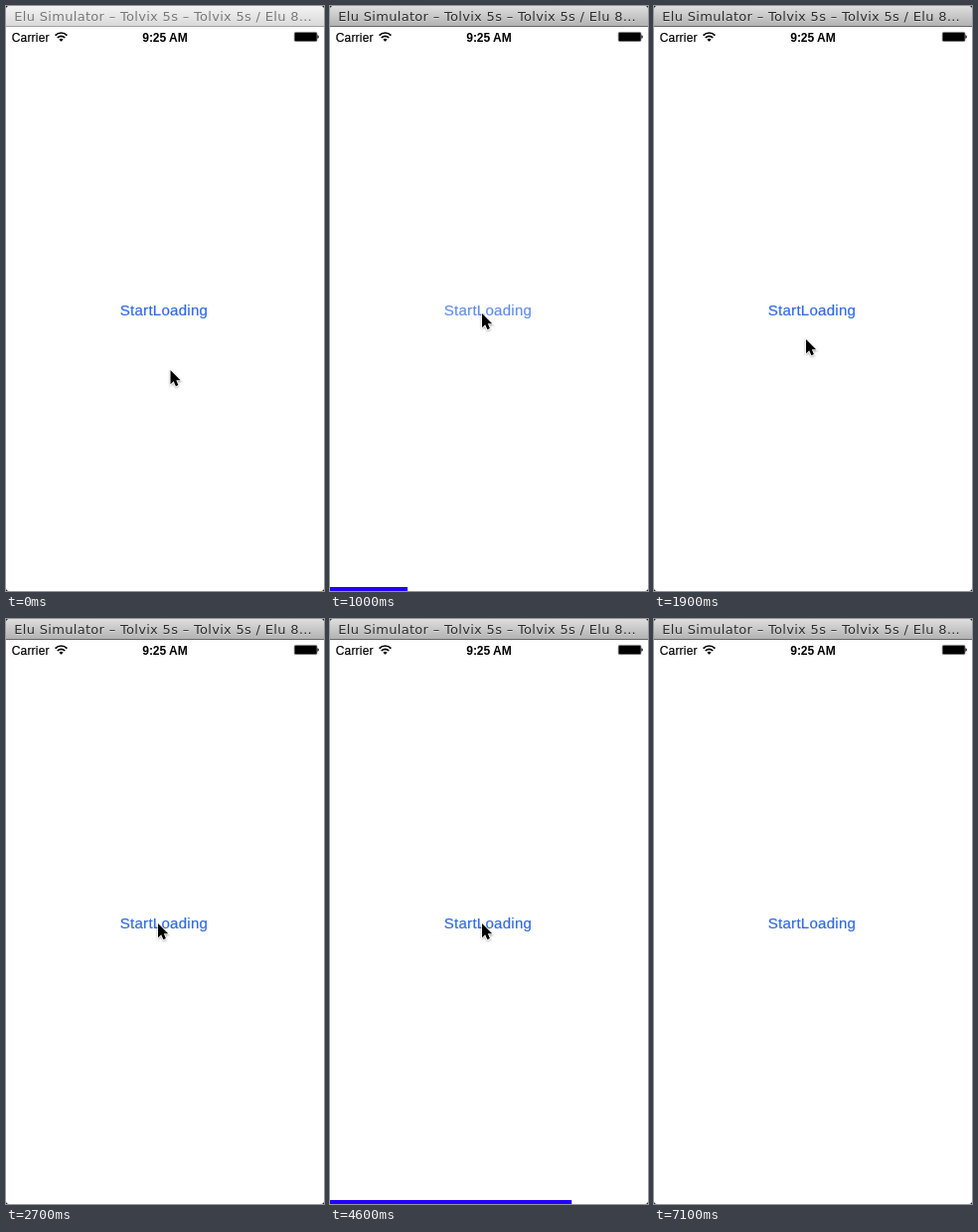
These frames come from a looping animation (320 px wide and 588 px high, 7200 ms). An HTML page:

```html
<!DOCTYPE html>
<html lang="en">
<head>
<meta charset="utf-8">
<title>Loading bar</title>
<style>
  html, body { margin: 0; width: 100%; height: 100%; overflow: hidden; background: #fff; }
  svg { display: block; width: 320px; height: 588px; }
  .ui { font-family: "Liberation Sans", Arial, sans-serif; }
  .title { font: 13px "DejaVu Sans", sans-serif; letter-spacing: .31px; }
</style>
</head>
<body>
<svg viewBox="0 0 320 588" xmlns="http://www.w3.org/2000/svg">
  <defs>
    <linearGradient id="idle" x2="0" y2="1">
      <stop stop-color="#f3f3f3"/><stop offset="1" stop-color="#d8d8d8"/>
    </linearGradient>
    <linearGradient id="active" x2="0" y2="1">
      <stop stop-color="#dedede"/><stop offset="1" stop-color="#b0b0b0"/>
    </linearGradient>
    <filter id="shadow" x="-50%" y="-50%" width="200%" height="200%">
      <feDropShadow dx="0" dy="1" stdDeviation="1" flood-opacity=".4"/>
    </filter>
  </defs>
  <rect width="320" height="588" fill="#fff"/>

  <path d="M0 0h4Q0 0 0 4zM320 0h-4q4 0 4 4z" fill="#222"/>
  <path id="chrome" d="M0 21V4Q0 0 4 0H316Q320 0 320 4V21Z"/>
  <rect id="edge" y="20" width="320" height="1"/>
  <text class="title" x="8.3" y="16" fill="#fff" fill-opacity=".45">Elu Simulator – Tolvix 5s – Tolvix 5s / Elu 8…</text>
  <text class="title" id="title" x="8.3" y="15">Elu Simulator – Tolvix 5s – Tolvix 5s / Elu 8…</text>

  <g class="ui" font-size="12">
    <text x="5.7" y="35.5" letter-spacing=".2" stroke="#000" stroke-width=".2">Carrier</text>
    <text x="160" y="35.5" font-weight="bold" text-anchor="middle">9:25 AM</text>
  </g>
  <g fill="none" stroke="#000" stroke-width="1.7">
    <path d="M49.6 29.6a8 8 0 0 1 11.8 0M51.8 32a5 5 0 0 1 7.4 0"/>
    <path d="M55.5 35.8l-2.1-2.1a3 3 0 0 1 4.2 0z" fill="#000" stroke="none"/>
  </g>
  <rect x="290.2" y="26.4" width="22.8" height="9.2" rx="1.4" fill="#222" stroke="#666" stroke-width=".6"/>
  <rect x="291" y="27" width="21" height="8" rx=".8"/>
  <path d="M313.4 29.2q1.4.3 1.4 1.8t-1.4 1.8z"/>

  <text class="ui" id="button" x="114.8" y="310.5" font-size="15" letter-spacing=".27"
    fill="#2e69e6" stroke="#2e69e6" stroke-width=".2">StartLoading</text>

  <path d="M0 585v3h3q-3 0-3-3zM320 585v3h-3q3 0 3-3z" fill="#111"/>
  <rect id="bar" y="584" height="4" fill="#2200fe"/>
  <path id="cursor" filter="url(#shadow)" stroke="#fff" stroke-width="1.2" paint-order="stroke"
    d="M0 0V14.2L3.2 11.2L5.4 16.2L7.9 15.1L5.8 10.3H10.2Z"/>
</svg>
<script>
  const LOOP = 7200, TICK = 100;
  const ACTIVATE = 700, HIDE_CURSOR = 5700;
  const BAR_SPEED = 0.64, BAR_LIFE = 560, FADE = 450, DIM = 0.2;

  // Each click: finger down, finger up, bar start
  const clicks = [
    { down: 700, up: 800, bar: 878 },
    { down: 2800, up: 2980, bar: 2990 },
    { down: 4100, up: 4200, bar: 4220 }
  ];
  // Pointer path: time, x, y
  const path = [
    [0, 165.5, 366], [650, 153, 309], [1400, 153, 309],
    [1800, 153, 335], [2000, 153, 335], [2450, 153, 306]
  ];

  const el = id => document.getElementById(id);
  const set = (id, attrs) => {
    for (const key in attrs) el(id).setAttribute(key, attrs[key]);
  };
  const smooth = p => p * p * (3 - 2 * p);
  const easeOut = p => 1 - (1 - p) ** 2;

  function pointer(t) {
    const i = path.findIndex(p => p[0] > t);
    if (i < 0) return path[path.length - 1].slice(1);
    const [a, b] = [path[i - 1], path[i]];
    const k = smooth((t - a[0]) / (b[0] - a[0]));
    return [a[1] + (b[1] - a[1]) * k, a[2] + (b[2] - a[2]) * k];
  }

  function buttonAlpha(t) {
    const c = clicks.find(c => t >= c.down && t < c.up + FADE);
    if (!c) return 1;
    return t < c.up ? DIM : DIM + (1 - DIM) * easeOut((t - c.up) / FADE);
  }

  function barWidth(t) {
    const c = clicks.find(c => t >= c.bar && t < c.bar + BAR_LIFE);
    return c ? Math.min(320, (t - c.bar) * BAR_SPEED) : 0;
  }

  function draw(t) {
    const active = t >= ACTIVATE;
    set("chrome", { fill: `url(#${active ? "active" : "idle"})` });
    set("edge", { fill: active ? "#686868" : "#a2a2a2" });
    set("title", { fill: active ? "#2c2c2c" : "#777" });
    set("button", { opacity: buttonAlpha(t) });
    set("bar", { width: barWidth(t) });
    set("cursor", {
      transform: `translate(${pointer(t)})`,
      visibility: t < HIDE_CURSOR ? "visible" : "hidden"
    });
  }

  const start = performance.now();
  function frame() {
    const t = (performance.now() - start) % LOOP;
    draw(Math.floor(t / TICK) * TICK);
    requestAnimationFrame(frame);
  }
  frame();
</script>
</body>
</html>
```
